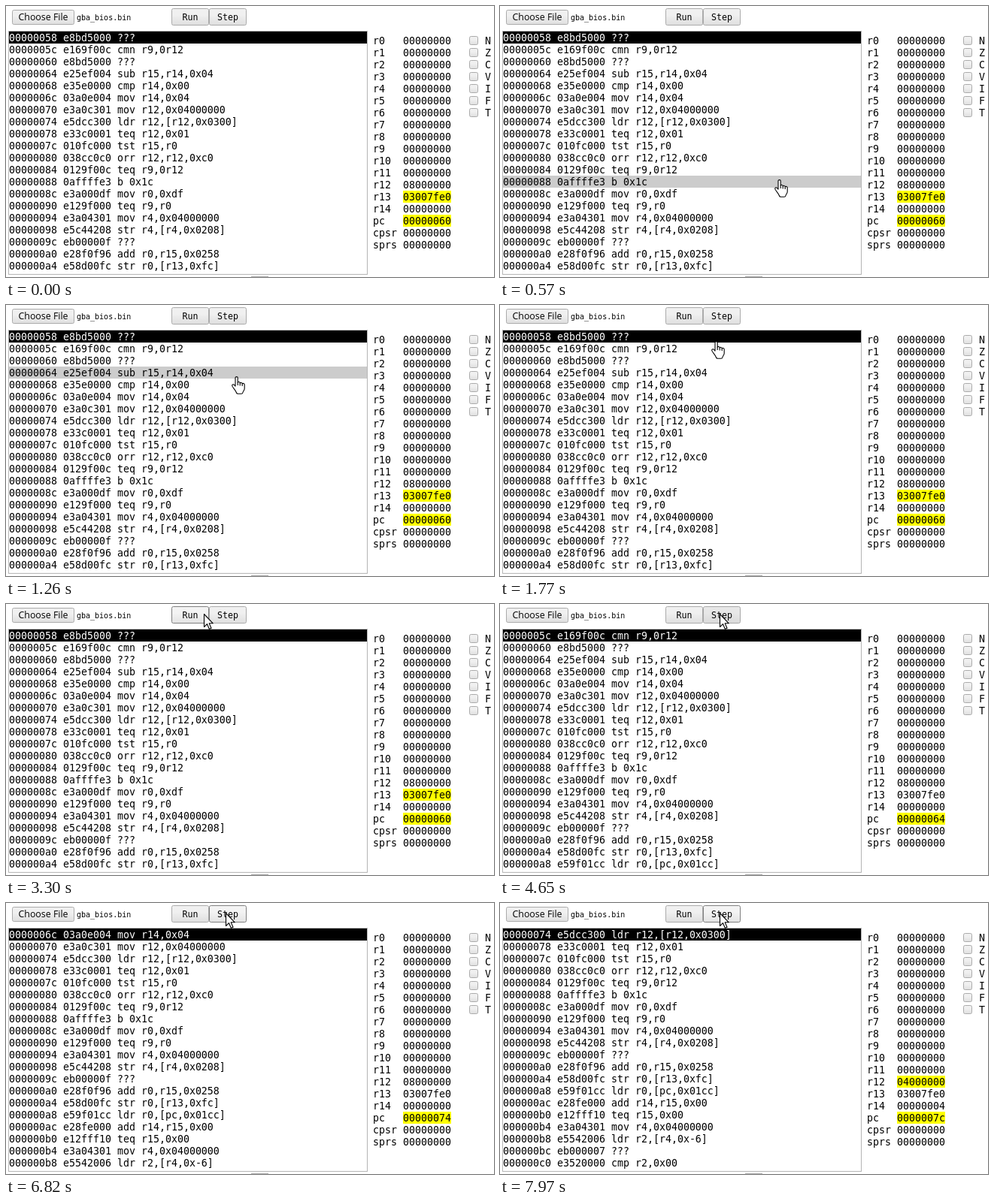
An HTML page with a canvas that plays this animation: 649x361 px, repeating every 8 s.

```html
<!DOCTYPE html>
<html lang="en">
<head>
<meta charset="utf-8">
<title>Step debugger</title>
<style>
html, body { margin: 0; width: 100%; height: 100%; overflow: hidden; background: #fff; }
canvas { display: block; }
</style>
</head>
<body>
<canvas id="stage" width="649" height="361"></canvas>
<script>
const ctx = document.getElementById('stage').getContext('2d');
const LOOP = 8000, ROWS = 20, ROW_H = 16, LIST_TOP = 34, BASE = 0x58;
const MONO = '"DejaVu Sans Mono", monospace';

const program = `e8bd5000 ???
e169f00c cmn r9,0r12
e8bd5000 ???
e25ef004 sub r15,r14,0x04
e35e0000 cmp r14,0x00
03a0e004 mov r14,0x04
e3a0c301 mov r12,0x04000000
e5dcc300 ldr r12,[r12,0x0300]
e33c0001 teq r12,0x01
010fc000 tst r15,r0
038cc0c0 orr r12,r12,0xc0
0129f00c teq r9,0r12
0affffe3 b 0x1c
e3a000df mov r0,0xdf
e129f000 teq r9,r0
e3a04301 mov r4,0x04000000
e5c44208 str r4,[r4,0x0208]
eb00000f ???
e28f0f96 add r0,r15,0x0258
e58d00fc str r0,[r13,0xfc]
e59f01cc ldr r0,[pc,0x01cc]
e28fe000 add r14,r15,0x00
e12fff10 teq r15,0x00
e3a04301 mov r4,0x04000000
e5542006 ldr r2,[r4,0x-6]
eb000007 ???
e3520000 cmp r2,0x00`.split('\n');

const registers = [...Array(15).keys()].map(i => 'r' + i).concat('pc', 'cpsr', 'sprs');

// [press, release]; the machine advances on release
const clicks = [[3680, 3760], [4650, 4700], [5440, 5520], [6130, 6210],
                [6720, 6820], [7330, 7430], [7890, 7970]];

// Pointer hot spot: [time, x, y]
const pointerPath = [
  [260, 481, 345], [570, 371, 232], [950, 323, 140], [1030, 318, 125],
  [1080, 317, 123], [1510, 292, 60], [1690, 291, 57], [1770, 287, 49],
  [2000, 266, 24], [2280, 250, 13], [3250, 253, 13], [3450, 292, 13], [LOOP, 292, 13]
];

const arrow = new Path2D('M.5 .5V17.5L4.5 13.7L7.3 20.3L10 19.2L7.2 12.8H12.3Z');
const hand = new Path2D('M5 2C5 .2 8.2 .2 8.2 2V8C8.8 7 11.2 7.2 11.2 9C11.8 8 14.2 8.3 14.2 9.9' +
  'C14.8 9 17.2 9.4 17.2 11.2V16.2C17.2 18.7 15.3 19.8 15 21.5Q14.7 23.3 13 23.3H8.5' +
  'Q6.8 23.3 6.3 21.5C5.4 18.5 2 15.6 .8 12.9C.2 11 2.4 10 3.6 11.5L5 13.2Z');
const knuckles = new Path2D('M8.2 8V12M11.2 9V12.5M14.2 10V13');

const hex = n => n.toString(16).padStart(8, '0');

function pointerAt(t) {
  const i = pointerPath.findIndex(p => p[0] > t);
  if (i < 1) return null;
  const [t0, x0, y0] = pointerPath[i - 1], [t1, x1, y1] = pointerPath[i];
  const k = (t - t0) / (t1 - t0);
  return { x: Math.round(x0 + (x1 - x0) * k), y: Math.round(y0 + (y1 - y0) * k) };
}

function rect(x, y, w, h, color) {
  ctx.fillStyle = color;
  ctx.fillRect(x, y, w, h);
}

function text(str, x, y, color = '#000', font = '13.29px ' + MONO, align = 'left') {
  ctx.font = font;
  ctx.textAlign = align;
  ctx.fillStyle = color;
  ctx.fillText(str, x, y);
}

function bevel(x, y, w, h, top, bottom, border) {
  const fill = ctx.createLinearGradient(0, y, 0, y + h);
  fill.addColorStop(0, top);
  fill.addColorStop(0.38, top);
  fill.addColorStop(1, bottom);
  ctx.beginPath();
  ctx.roundRect(x + 0.5, y + 0.5, w - 1, h - 1, 2);
  ctx.fillStyle = fill;
  ctx.fill();
  ctx.strokeStyle = border;
  ctx.lineWidth = 1;
  ctx.stroke();
}

const looks = {
  normal: ['#f0f0f0', '#dedede', '#ababab'],
  hover: ['#f3f3f3', '#e2e2e2', '#808080'],
  active: ['#e7e7e7', '#d9d9d9', '#a8a8a8']
};

function button(label, x, y, w, h, look, font) {
  bevel(x, y, w, h, ...looks[look]);
  text(label, x + w / 2, 19, '#000', font, 'center');
}

function drawToolbar(pointer, pressed) {
  const lookOf = x => {
    const over = pointer && pointer.y < 26 && pointer.x >= x && pointer.x < x + 50;
    return !over ? 'normal' : pressed ? 'active' : 'hover';
  };
  button('Choose File', 8, 5, 83, 20, 'normal', '12.4px "Open Sans", sans-serif');
  text('gba_bios.bin', 94, 19, '#000', '10px ' + MONO);
  button('Run', 220, 3, 50, 23, lookOf(220), '11.6px ' + MONO);
  button('Step', 270, 3, 50, 23, lookOf(270), '11.6px ' + MONO);
}

function drawListing(steps, hoverRow) {
  ctx.strokeStyle = '#b5b5b5';
  ctx.lineWidth = 1;
  ctx.strokeRect(3.5, 33.5, 477, 324);
  for (let row = 0; row < ROWS; row++) {
    const y = LIST_TOP + row * ROW_H, line = steps + row;
    if (row === 0) rect(4, y, 476, ROW_H, '#000');
    else if (row === hoverRow) rect(4, y, 476, ROW_H, '#ccc');
    text(`${hex(BASE + 4 * line)} ${program[line]}`, 4, y + 13, row ? '#000' : '#fff');
  }
}

function drawRegisters(steps) {
  const values = {
    r12: steps < 7 ? 0x08000000 : 0x04000000,
    r13: 0x03007fe0,
    r14: steps < 6 ? 0 : 4,
    pc: BASE + 8 + 4 * steps
  };
  const changed = ['pc', { 0: 'r13', 6: 'r14', 7: 'r12' }[steps]];
  registers.forEach((name, i) => {
    const y = 38 + i * ROW_H;
    if (changed.includes(name)) rect(528, y, 64, ROW_H, '#ff0');
    text(name, 488, y + 13);
    text(hex(values[name] || 0), 528, y + 13);
  });
  [...'NZCVIFT'].forEach((flag, i) => {
    const y = 38 + i * ROW_H;
    bevel(616, y + 2, 12, 12, '#f0f0f0', '#dedede', '#ababab');
    text(flag, 637, y + 13);
  });
}

function drawPointer({ x, y }, overList) {
  ctx.save();
  ctx.translate(overList ? x - 6 : x, overList ? y - 1 : y);
  ctx.fillStyle = '#fff';
  ctx.strokeStyle = '#000';
  ctx.lineWidth = 1.1;
  ctx.lineJoin = 'round';
  const shape = overList ? hand : arrow;
  ctx.fill(shape);
  ctx.stroke(shape);
  if (overList) ctx.stroke(knuckles);
  ctx.restore();
}

function draw(t) {
  const steps = clicks.filter(([, release]) => t >= release).length;
  const pressed = clicks.some(([press, release]) => t >= press && t < release);
  const pointer = pointerAt(t);
  const overList = pointer && pointer.x < 480 && pointer.y >= LIST_TOP;
  const hoverRow = overList ? Math.floor((pointer.y - LIST_TOP) / ROW_H) : -1;

  rect(0, 0, 649, 361, '#fff');
  drawToolbar(pointer, pressed);
  drawListing(steps, hoverRow);
  drawRegisters(steps);
  rect(326, 360, 23, 1, '#ababab');
  if (pointer) drawPointer(pointer, overList);
}

const start = performance.now();
function frame() {
  draw((performance.now() - start) % LOOP);
  requestAnimationFrame(frame);
}
frame();
</script>
</body>
</html>
```
